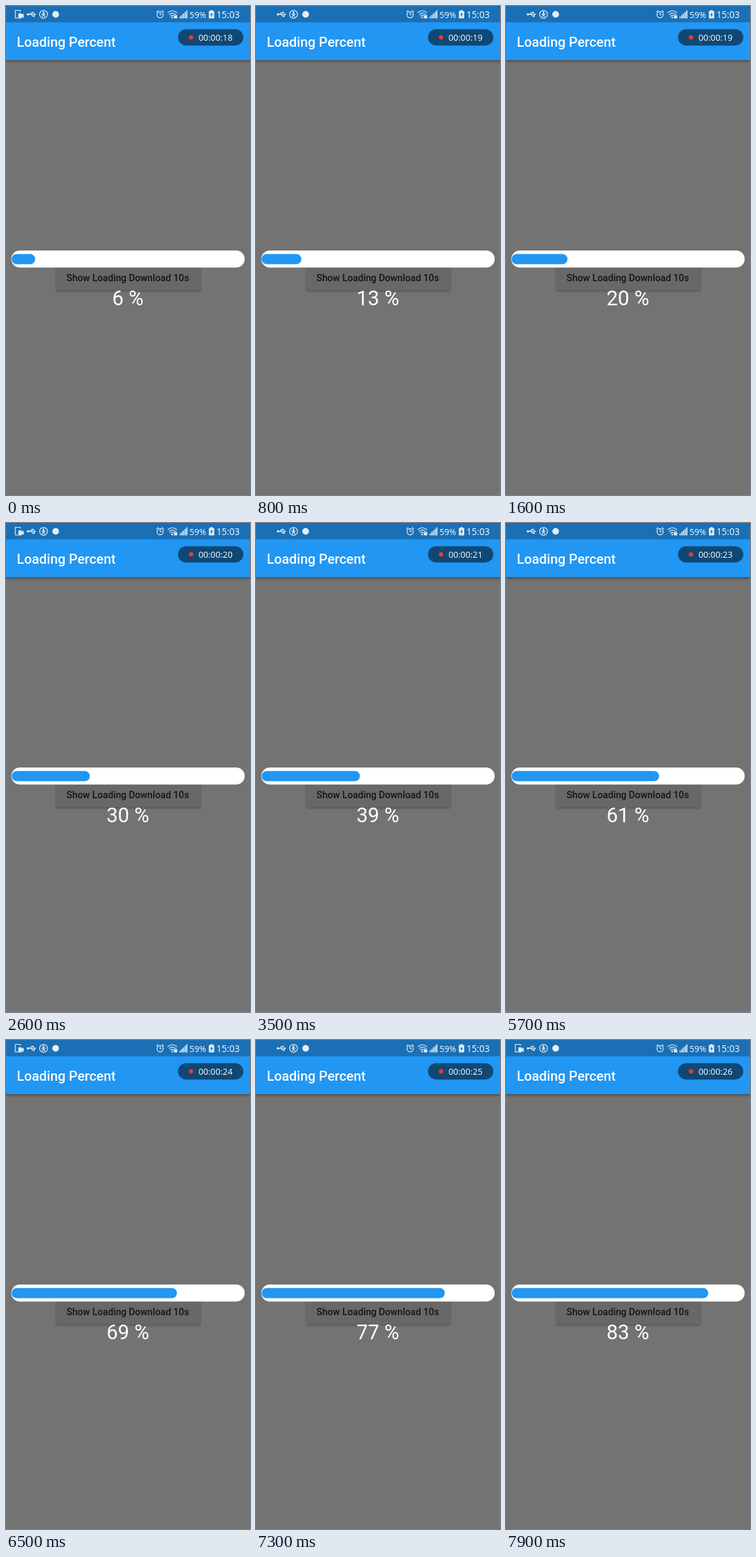
An HTML page for the animation above (8000 ms loop, 366 by 732 pixels).

```html
<!DOCTYPE html>
<html lang="en">
<head>
<meta charset="utf-8">
<title>Loading Percent</title>
<style>
  html, body { margin: 0; width: 100%; height: 100%; overflow: hidden; background: #737373; }
  svg { display: block; width: 100%; height: 100%; }
  text { font-family: Roboto, sans-serif; fill: #fff; }
  .system { font-family: "Open Sans", "Noto Sans", sans-serif; }
  .line { fill: none; stroke: #e3eef7; stroke-width: 1.2; stroke-linecap: round; stroke-linejoin: round; }
  .solid { fill: #e3eef7; }
</style>
</head>
<body>
<svg viewBox="0 0 366 732">
  <defs>
    <linearGradient id="shade" x2="0" y2="1">
      <stop offset="0" stop-opacity=".3"/>
      <stop offset="1" stop-opacity="0"/>
    </linearGradient>
    <filter id="lift" x="-5%" y="-20%" width="110%" height="150%">
      <feDropShadow dx="0" dy="1.5" stdDeviation="1.2" flood-opacity=".3"/>
    </filter>
  </defs>

  <rect width="366" height="732" fill="#737373"/>
  <rect y="81" width="366" height="5" fill="url(#shade)"/>
  <rect width="366" height="81" fill="#2196f3"/>
  <rect width="366" height="24.4" fill="#1a6fb5"/>

  <!-- Status bar, left -->
  <g id="recorder">
    <path class="line" d="M21.5 8V6.5H14V18H18"/>
    <path class="solid" d="M18.5 11H23.5V13L26.5 11.2V18L23.5 16.3V18.5H18.5Z"/>
  </g>
  <g>
    <path class="line" d="M33 12.5H43M35.5 12.5L38 9.8H40M37.5 12.5L40 15.2H41.5"/>
    <circle class="solid" cx="33" cy="12.5" r="1.7"/>
    <path class="solid" d="M42.3 10.7L45.3 12.5L42.3 14.3ZM39.5 8.7H41.7V10.9H39.5ZM40.8 14.1H43V16.3H40.8Z"/>
  </g>
  <g>
    <circle class="line" cx="56.3" cy="12.4" r="5.9" stroke-width="1"/>
    <circle class="solid" cx="56.3" cy="8.9" r="1.2"/>
    <path class="line" d="M56.3 10.5V13L54.3 16.2M56.3 13L58.3 16.2M53.8 12.7L56.3 10.7L58.8 12.7"/>
  </g>
  <circle class="solid" cx="74.5" cy="12.5" r="5"/>

  <!-- Status bar, right -->
  <g class="line">
    <circle cx="231.2" cy="13" r="4.7"/>
    <path d="M231.2 10.2V13H233.4M226 8.7L228.2 6.9M236.4 8.7L234.2 6.9"/>
  </g>
  <g class="line" stroke-width="1.4">
    <path d="M243 9.8Q249.5 4.2 256 9.8M245 12.6Q249.5 8.7 253.5 12.1M247 15.2Q249.5 13 251.5 14.6"/>
    <path d="M253 14.5V13.3Q254.4 11.6 255.8 13.3V14.5" stroke-width="1"/>
  </g>
  <circle class="solid" cx="249.4" cy="17.3" r="1.2"/>
  <rect class="solid" x="252" y="14.3" width="4.8" height="4.2"/>
  <g id="signal" class="solid"></g>
  <text class="system" x="275.3" y="17.5" font-size="12.7">59%</text>
  <path class="solid" d="M306.6 6.3H310V7.6H312.3V18.6H304.3V7.6H306.6Z"/>
  <path d="M309 9L306.2 13.6H308L307.4 17L310.5 12.2H308.6Z" fill="#1a6fb5"/>
  <text class="system" x="315.7" y="17.6" font-size="13.7">15:03</text>

  <!-- App bar -->
  <text x="16.3" y="60.6" font-size="20.3" font-weight="500">Loading Percent</text>
  <rect x="258" y="34.7" width="98" height="24.5" rx="12.25" fill="#104875"/>
  <circle cx="277.5" cy="47" r="3.2" fill="#f43a24"/>
  <text id="timer" class="system" x="288.7" y="51.8" font-size="12.9"></text>

  <!-- Download dialog -->
  <rect x="75" y="389" width="217" height="36.5" rx="2" fill="#676767" filter="url(#lift)"/>
  <text x="90.8" y="412.2" font-size="14.23" font-weight="500" style="fill:#141414">Show Loading Download 10s</text>
  <rect x="8" y="366" width="350" height="25.4" rx="12.7" fill="#fff"/>
  <rect id="bar" x="8.5" y="371.2" height="15.2" rx="7.6" fill="#2196f3"/>
  <text id="percent" x="182.8" y="448.2" font-size="30.5" text-anchor="middle"></text>
</svg>
<script>
  const LOOP = 8000, STEP = 100;
  const BLINKS = [700, 1700, 2700, 3700, 4700, 5800, 6800, 7800];
  const byId = id => document.getElementById(id);
  const recorder = byId("recorder"), timer = byId("timer"), bar = byId("bar"), percent = byId("percent");

  byId("signal").innerHTML = [0, 1, 2, 3, 4].map(i =>
    `<rect x="${260.4 + i * 2.5}" y="${15.8 - i * 2.3}" width="1.7" height="${2.7 + i * 2.3}"/>`).join("");

  // The download starts slightly slower, then gains about 1% per step.
  const progress = t => t < 1600 ? 6.1 + 14.5 * t / 1600 : 20.6 + (t - 1600) * 0.01003;

  function render(time) {
    const t = Math.floor(time % LOOP / STEP) * STEP;
    const p = progress(t);
    const toggles = BLINKS.filter(b => b <= t).length;
    recorder.style.display = toggles % 2 ? "none" : "";
    timer.textContent = "00:00:" + (18 + Math.floor((t + 200) / 1000));
    bar.setAttribute("width", 15 + p * 3.34);
    percent.textContent = Math.floor(p) + " %";
  }

  const start = performance.now();
  function tick() {
    render(performance.now() - start);
    requestAnimationFrame(tick);
  }
  tick();
</script>
</body>
</html>
```
